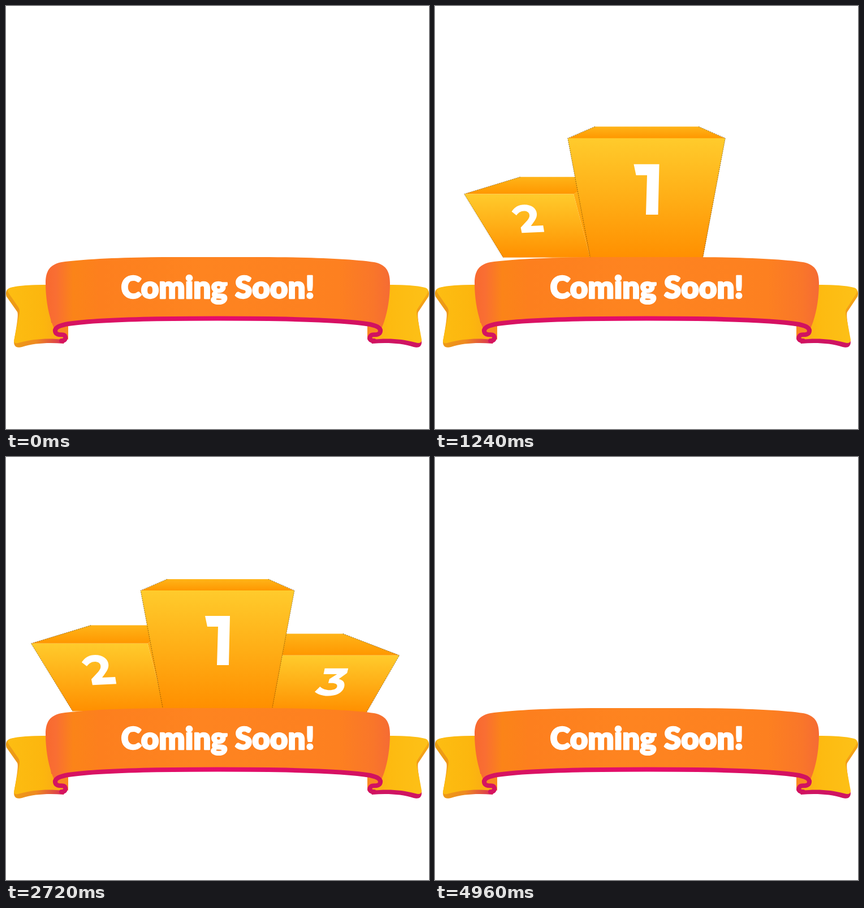
Recreate the animation shown at these times as an HTML page. Size 748 px wide and 748 px high, loop 5000 ms.

```html
<!DOCTYPE html>
<html lang="en">
<head>
<meta charset="utf-8">
<title>Coming Soon</title>
<style>
  html, body { margin: 0; width: 100%; height: 100%; overflow: hidden; background: #fff; }
  svg { display: block; width: 100%; height: 100%; }
  .front { fill: url(#front); }
  .top { fill: url(#top); }
  .side { fill: url(#side); }
  .digit, .label { fill: #fff; }
  .edge { fill: none; stroke: #4a3000; stroke-width: .8; stroke-dasharray: 2 1.6; opacity: .75; }
  .pink { fill: none; stroke: url(#pink); stroke-width: 8; stroke-linecap: round; stroke-linejoin: round; }
  .label { font: 900 54.5px Lato, "Open Sans", sans-serif; stroke: #fff; stroke-width: 2.4; stroke-linejoin: round; }
</style>
</head>
<body>
<svg viewBox="0 0 748 748">
  <defs>
    <linearGradient id="front" x2="0" y2="1">
      <stop offset="0" stop-color="#ffcb2c"/>
      <stop offset=".5" stop-color="#ffae16"/>
      <stop offset="1" stop-color="#ff8f00"/>
    </linearGradient>
    <linearGradient id="top" x2="0" y2="1">
      <stop offset="0" stop-color="#ffb418"/>
      <stop offset="1" stop-color="#ff9700"/>
    </linearGradient>
    <linearGradient id="side" x2="0" y2="1">
      <stop offset="0" stop-color="#ffb51a"/>
      <stop offset="1" stop-color="#ff9200"/>
    </linearGradient>
    <linearGradient id="band" gradientUnits="userSpaceOnUse" x1="70" x2="680" y1="0" y2="0">
      <stop offset="0" stop-color="#f8692f"/>
      <stop offset=".03" stop-color="#f96e33"/>
      <stop offset=".08" stop-color="#fb8418"/>
      <stop offset=".16" stop-color="#fd7f1e"/>
      <stop offset=".45" stop-color="#fe8420"/>
      <stop offset=".85" stop-color="#fd8020"/>
      <stop offset=".95" stop-color="#f9762a"/>
      <stop offset="1" stop-color="#f56b34"/>
    </linearGradient>
    <linearGradient id="pink" gradientUnits="userSpaceOnUse" x1="80" x2="668" y1="0" y2="0">
      <stop offset="0" stop-color="#d4145f"/>
      <stop offset=".5" stop-color="#e60c6c"/>
      <stop offset="1" stop-color="#d0125f"/>
    </linearGradient>
    <linearGradient id="rimL">
      <stop offset="0" stop-color="#eda012"/>
      <stop offset=".5" stop-color="#ee8a20"/>
      <stop offset="1" stop-color="#d8265a"/>
    </linearGradient>
    <linearGradient id="rimR" x2="0" y2="1">
      <stop offset="0" stop-color="#f8ad14"/>
      <stop offset=".5" stop-color="#f0981a"/>
      <stop offset=".7" stop-color="#cf1462"/>
    </linearGradient>
    <linearGradient id="tailL">
      <stop offset="0" stop-color="#fdbd12"/>
      <stop offset=".6" stop-color="#fcb60e"/>
      <stop offset="1" stop-color="#f9a51a"/>
    </linearGradient>
    <linearGradient id="tailR">
      <stop offset="0" stop-color="#fba51a"/>
      <stop offset=".35" stop-color="#fdba10"/>
      <stop offset="1" stop-color="#fdc118"/>
    </linearGradient>
  </defs>

  <g class="block">
    <path class="side" d="M250 330L305 298L300 427L281 449Z"/>
    <path class="top" d="M45 330L150 298H306L250 330Z"/>
    <path class="front" d="M45 330H250L281 449H118Z"/>
    <path class="edge" d="M150 298L45 330L118 449"/>
    <path class="digit" d="M134 363C140 354 147 350 158 350C171 350 180 357 181 366C182 374 178 379 170 390L193 389L195 401L153 403L151 393L163 380C167 375 168 372 167 368C166 364 162 362 157 362C151 362 147 365 143 370Z"/>
  </g>
  <g class="block">
    <path class="side" d="M492 352L452 315V428L466 449Z"/>
    <path class="top" d="M691 352L595 315H452L492 352Z"/>
    <path class="front" d="M691 352H492L466 449H635Z"/>
    <path class="edge" d="M595 315L691 352L635 449"/>
    <path class="digit" d="M564 374H604L602 382L588 392C596 394 599 399 597 406C594 416 583 421 569 421C560 421 552 418 547 414L556 405C560 409 566 411 572 411C579 411 584 409 585 405C586 401 582 399 576 399H570L572 392L585 384H562Z"/>
  </g>
  <g class="block">
    <path class="top" d="M238 236.500L285 216H464L510 236.500Z"/>
    <path class="front" d="M238 236H510L471 444.500H277Z"/>
    <path class="edge" d="M285 216L238 236L277 443M464 216L510 236L471 443"/>
    <path class="digit" d="M352 281H396L394 368H373L375 300H356Z"/>
  </g>

  <!-- tails -->
  <path fill="url(#rimL)" d="M75 494C45 493 20 495 6 499C0 501-1 508 1 514L20 541C22 546 20 560 14 594C14 603 20 605 28 603C50 596 75 595 102 597L106 588L90 560Z"/>
  <path fill="url(#tailL)" d="M75 493C45 493 22 494 8 498C2 500 2 504 5 508L22 533C25 538 24 543 22 552L14 592C14 597 18 597 25 595C50 588 75 587 104 590L108 560H80Z"/>
  <path fill="url(#rimR)" d="M673 494C703 493 728 495 742 499C748 501 749 508 747 514L729 541C727 546 729 560 735 594C735 603 729 605 721 603C699 596 674 595 647 597L642 588L658 560Z"/>
  <path fill="url(#tailR)" d="M673 493C703 493 727 494 741 498C748 500 747 505 744 510L728 535C725 539 726 544 728 552L735 590C735 596 731 597 724 595C699 588 674 587 645 590L640 560H668Z"/>

  <!-- folds -->
  <path fill="#f98a20" d="M84 566L110 558V590L98 583L88 580Z"/>
  <path fill="#f98a20" d="M664 566L639 558V590L650 583L660 580Z"/>

  <!-- band -->
  <path fill="url(#band)" d="M86 572C76 552 70 520 70 490C70 468 78 457 98 453C140 447 220 444 300 444H450C530 444 610 447 651 453C671 457 679 468 679 490C679 520 673 552 663 572C655 563 640 561 600 558C530 553 460 552 374.500 552C289 552 219 553 149 558C109 561 94 563 86 572Z"/>
  <path class="pink" d="M98 592C104 592 107 588 104 583C101 579 92 584 88 578C84 570 92 566 105 563C150 555 250 552.500 374.500 552.500C499 552.500 599 555 644 563C657 566 665 570 661 578C657 584 648 579 645 583C641 588 644 592 651 592"/>
  <text class="label" y="517"><tspan x="203.500">Coming</tspan><tspan x="405">Soon!</tspan></text>
</svg>
<script>
  const LOOP = 5000, STEP = 40, HALF = 340, RISE = 390, SWELL = 260, FALL = 250;

  // centre, time of first overshoot, overshoot size, start of exit
  const specs = [
    { x: 162, y: 373, peak: 1365, amp: .23, leave: 4373 },
    { x: 573, y: 382, peak: 2075, amp: .25, leave: 4445 },
    { x: 374, y: 330, peak: 510, amp: .21, leave: 4310 }
  ];
  const blocks = document.querySelectorAll('.block');
  const ease = p => (1 - Math.cos(Math.PI * p)) / 2;

  function scaleAt(t, { peak, amp, leave }) {
    const big = 1 + amp;
    if (t < peak - RISE) return 0;
    if (t < peak) return big * ease((t - peak + RISE) / RISE);
    if (t < leave) {
      if (t >= 3400) return 1;
      const d = (t - peak) / HALF;
      return 1 + amp * Math.exp(-.95 * d) * Math.cos(Math.PI * d);
    }
    const d = t - leave;
    if (d < SWELL) return 1 + .21 * ease(d / SWELL);
    return 1.21 * Math.max(0, 1 - ((d - SWELL) / FALL) ** 3);
  }

  function draw(now) {
    const t = Math.floor((now % LOOP) / STEP) * STEP;
    specs.forEach((b, i) => {
      const s = scaleAt(t, b);
      blocks[i].style.display = s > .005 ? '' : 'none';
      blocks[i].setAttribute('transform',
        `translate(${b.x} ${b.y}) scale(${s.toFixed(4)}) translate(${-b.x} ${-b.y})`);
    });
  }

  const start = performance.now();
  function tick() {
    draw(performance.now() - start);
    requestAnimationFrame(tick);
  }
  tick();
</script>
</body>
</html>
```
